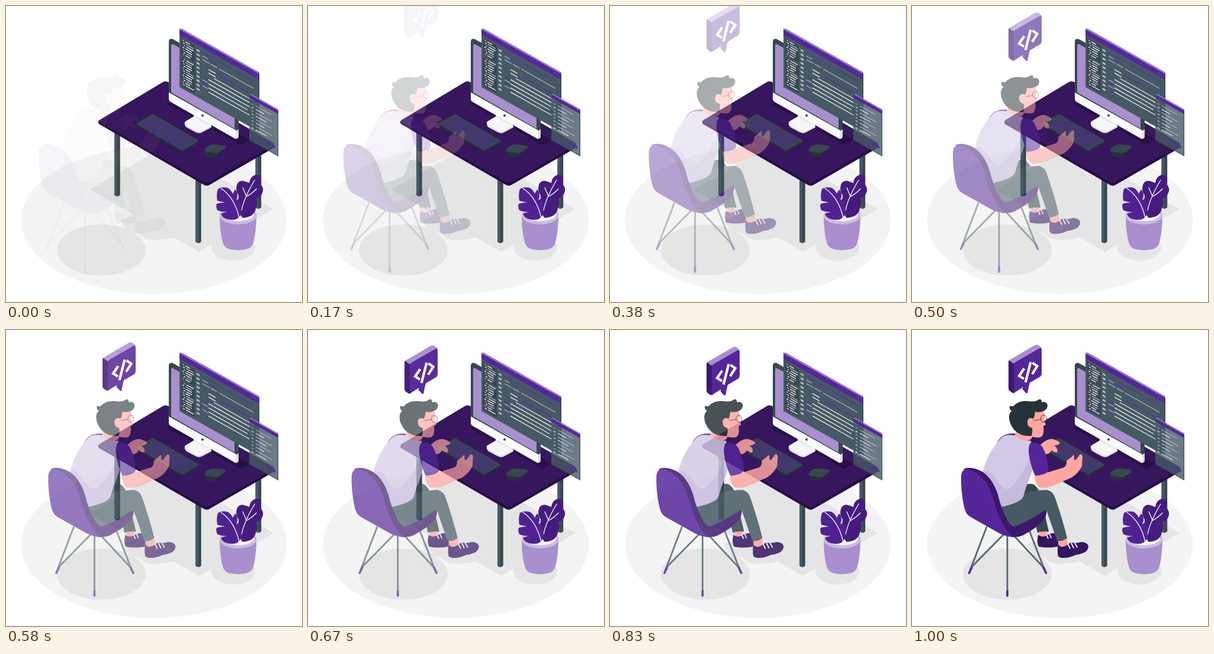
An HTML page for the animation above (1.04 s loop, 500 px wide and 500 px high).

```html
<!DOCTYPE html>
<html lang="en">
<head>
<meta charset="utf-8">
<title>Developer at a desk</title>
<style>
html, body { margin: 0; width: 100%; height: 100%; overflow: hidden; background: #fff; }
svg { display: block; width: 100vw; height: 100vh; }
.line { fill: none; stroke-linecap: round; stroke-linejoin: round; }
.lilac { fill: #a98fcd; }
.purple { fill: #54269a; }
.slate { fill: #455a64; }
.dark { fill: #37474f; }
.ink { fill: #263238; }
.skin { fill: #ffa6a1; }
.shade { fill: #e5e5e5; }
</style>
</head>
<body>
<svg viewBox="0 0 500 500">
  <!-- floor and shadows -->
  <ellipse cx="249.8" cy="362" rx="224.5" ry="124.5" fill="#f4f4f4"/>
  <ellipse cx="161" cy="412.3" rx="75" ry="43.3" class="shade"/>
  <path class="shade" d="M142 310L268 237L452 343L326 415L283 391Q270 395 249 395Q233 395 225 385Q197 378 194 362L216 353Z"/>
  <ellipse cx="384" cy="408" rx="37" ry="22" class="shade"/>

  <!-- desk -->
  <g id="legs"></g>
  <path fill="#250d45" d="M156 194L156 198Q157 200 160 201L334 302Q339 305 344 302L450 241Q453 239 453 233Z"/>
  <path fill="#36175e" d="M159 192L265 128.500Q270 126 275 129L450 230Q455 233 450 236L344 297Q339 299.500 334 297L159 197Q154 194.500 159 192Z"/>
  <path fill="#271046" d="M272 166L290 157L411 226L396 235L346 207L318 190Z"/>

  <!-- monitor -->
  <path fill="#e4e4e4" d="M302 196L318 186L347 202L347 205L330 214Q325 216 320 213L305 205Q301 202 302 196Z"/>
  <path fill="#f6f6f6" d="M303 195L317 187L317 180L346 196L346 203L330 211Q325 213 320 210L304 201Q301 198 303 195Z"/>
  <path fill="#e4e4e4" d="M317 181L346 197L346 202Q331 196 317 187Z"/>
  <path class="dark" d="M275 61Q275 54 282 56L389 117Q393 120 393 124L393 212L389 214L275 149Z"/>
  <path class="lilac" d="M279 67Q279 63 283 65L382 121Q386 124 386 128L386 207L279 146Z"/>
  <path fill="#fafafa" d="M275 146L389 210L389 222Q389 226 385 223L278 162Q275 160 275 156Z"/>
  <path fill="#dedede" d="M389 211L393 208L393 221Q392 225 387 224.500L389 222Z"/>
  <circle cx="332" cy="185" r="2" class="dark"/>

  <!-- code window -->
  <g transform="matrix(1 .563 0 1 293 38)">
    <rect width="135" height="99" class="slate"/>
    <path class="purple" d="M0 1H135V10.500H0Z"/>
    <path fill="#9674c6" d="M0 3L3 -2H135V1L3 1.500Z"/>
    <path class="dark" d="M3 14H26V43H3ZM3 46H26V95H3ZM133.500 10.500H135V99H133.500Z"/>
    <g id="code"></g>
  </g>

  <!-- small window -->
  <g transform="matrix(1 .56 0 1 411 148)">
    <rect y="6" width="49" height="72.500" class="slate" opacity=".8"/>
    <rect y="1" width="49" height="6" class="purple"/>
    <path fill="#9674c6" d="M0 2L2 -1H49V1L2 1Z"/>
    <path class="dark" d="M48 7H49V78.500H48Z"/>
    <path class="dark" opacity=".6" d="M0 77H49V78.500H0Z"/>
    <g id="notes"></g>
  </g>

  <!-- keyboard and mouse -->
  <path class="ink" d="M220.500 198V202L295 245Q297.500 246.500 300 245L325 231V227Z"/>
  <path class="dark" d="M222 197L246 183.500Q248 182 250 183.500L324 226Q326 228 324 229L300 242.500Q297.500 244 295 242.500L222 200Q219 198.500 222 197Z"/>
  <g id="keys" transform="matrix(.77 .447 -.27 .15 248 183.500)"></g>
  <path class="ink" d="M335 244L336 249Q338 254 348 255.500Q352 256 356 252L371 241L371 238Z"/>
  <path class="dark" d="M335 244Q337 238 344 235Q348 233 353 234L368 235.500Q373 237 370 240L358 248Q352 249 346 247Q337 247 335 244Z"/>

  <!-- plant -->
  <path class="lilac" d="M361 352Q361 384 367 402Q371 412.500 392 412.500Q413 412.500 417 402Q423 384 423 350Z"/>
  <ellipse cx="392" cy="354" rx="31.300" ry="15" fill="#cbbbe2"/>
  <ellipse cx="392" cy="352" rx="27" ry="11.500" fill="#fafafa"/>
  <path fill="#451c7d" d="M400 358Q391 350 393 320Q387 312 390 302Q394 292 406 297L411 299Q412 288 422 285Q431 284 431 292Q431 297 430 301Q435 306 434 313Q431 323 423 325Q427 333 422 341Q421 356 400 358Z"/>
  <path class="line" stroke="#fff" stroke-width="1.300" d="M398 345Q402 324 420 294M400 307L406 321M406 322Q414 318 423 309"/>
  <path fill="#502290" d="M358 309Q364 305 374 307Q380 310 383 317L387 310Q391 313 391 322L389 328L394 325Q399 340 397 352Q392 363 378 361Q366 360 363 351Q368 348 374 348Q363 348 357 345Q354 339 356 334Q363 332 370 332L357 329Q355 318 358 309Z"/>
  <path class="line" stroke="#fff" stroke-width="1.300" d="M363 308Q386 323 394 358"/>

  <!-- worker on the chair -->
  <g id="worker">
    <path class="dark" d="M184 267Q194 257 206 261Q215 268 217 280L231 340Q222 345 212 342L201 300Z"/>
    <path class="skin" d="M214 341L228 340L229 351L217 353Z"/>
    <path fill="#341463" d="M213 346Q221 352 229 346Q236 342 243 344L248 357L246 366Q229 369 214 366Q210 358 213 346Z"/>
    <path class="line" stroke="#fff" stroke-width="1.700" d="M227 346L230 352M232 344L235 351"/>

    <path class="line" stroke="#546870" stroke-width="2.800" d="M126 333L98 406M157 343L101 400M161 345V448M168 343L221 400M197 336L225 408"/>
    <path class="line" stroke="#54269a" stroke-width="3.600" d="M101 401L96.500 410.500M161 441V449M222 401L226.500 410.500"/>
    <path fill="#3b186c" d="M150 312L227 302Q228 312 224 319Q212 334 187 347Q178 351 166 349Q150 344 145 328Z"/>

    <path class="skin" d="M246 352L262 349L263 363Q256 370 248 366Z"/>
    <path fill="#341463" d="M247 362Q252 370 262 363L268 359Q278 361 286 358Q297 359 298 365Q298 372 291 376Q284 379 276 380Q267 385 255 385Q248 385 246.500 381Q245 371 247 362Z"/>
    <path class="line" stroke="#fff" stroke-width="1.700" d="M263 361L267 369M269 360L273 368M275 360L279 367"/>
    <path class="slate" d="M146 302L187 276Q205 271 228 270Q238 272 242 284Q254 319 262 351Q255 358 245 356L228 307Q226 302 219 308Q192 326 165 335Q153 322 146 302Z"/>

    <!-- torso -->
    <path class="purple" d="M142 194Q150 172 176 175L170 184Z"/>
    <path class="skin" d="M177 170L204 176Q204 186 194 187Q180 186 173 179Z"/>
    <path fill="#d3c9e5" d="M150 183Q157 175 173 178Q183 187 201 187L205 232Q199 250 193 264L188 281Q184 292 149 299L119 242Q127 207 150 183Z"/>
    <path fill="#c6b9de" d="M119 240Q130 232 143 252Q152 271 164 268Q185 252 199 215L204 234Q199 250 193 264L188 281Q184 292 149 299Z"/>
    <path class="skin" d="M207 245Q208 261 215 266Q224 269 241 262L270 249Q281 242 287 230L288 214Q287 208 283 211L277 219Q273 222 274 212Q272 210 269 215Q266 217 261 221Q262 228 257 232L231 240Z"/>
    <path class="skin" d="M214 197Q225 184 237 184Q248 187 250 191Q247 195 240 195Q248 201 245 207Q240 207 236 203Q231 212 222 209L213 207Z"/>
    <path class="purple" d="M200 191Q212 188 220 197Q229 212 231 238Q223 246 208 246Q200 230 197 207Q197 194 200 191Z"/>

    <!-- head -->
    <path class="skin" d="M196 139L222 137Q226 145 223 153L226 159Q226 161 222 162Q224 177 218 181Q207 183 197 178Z"/>
    <path class="ink" d="M167 136Q163 131 166 128Q170 130 172 128Q180 119 195 120Q208 122 213 118Q219 115 219 122Q227 120 229 127Q229 134 222 137Q214 140 208 138Q207 146 205 150Q197 146 195 154Q196 163 203 166Q204 172 202 179Q183 180 173 169Q163 157 164 145Q165 139 169 136Z"/>
    <ellipse cx="201" cy="157" rx="6" ry="7.500" class="skin"/>
    <ellipse cx="222.500" cy="150" rx="5" ry="6" fill="none" stroke="#37474f"/>
    <path class="line" stroke="#37474f" d="M206 153L218 151"/>

    <!-- chair back -->
    <path fill="#3b186c" d="M87 235Q99 229 118 239Q136 250 145 278Q151 304 164 326Q171 336 190 332L172 350Q153 347 140 320Z"/>
    <path class="purple" d="M83 246Q84 235 94 235Q108 238 120 251Q132 264 138 287Q145 314 155 330Q162 344 173 350Q160 350 147 343L99 316Q91 312 88 299Q82 270 83 246Z"/>
  </g>

  <!-- speech bubble -->
  <g id="bubble">
    <path fill="#3d1a72" d="M163 54Q163 50 168 51L174 56V106L170 106.500L165 103Q163 102 163 98ZM186 99L191 97L198 91L195 107L192 106Z"/>
    <path class="lilac" d="M164 51L207 26Q211 24 214 26L219 30L173 57Q168 55 164 51Z"/>
    <path class="purple" d="M172 60Q172 56 175 54L215 31Q219 29 219 33V73Q219 77 216 79L199 89L194 107L187 97L175 104.500Q172 106 172 102Z"/>
    <path fill="none" stroke="#fff" stroke-width="4.200" d="M189.500 65L181 77.500L189 82.500M200.500 54L191.700 88.500M203.500 55.500L211.500 61L203 74.500"/>
  </g>
</svg>
<script>
const NS = "http://www.w3.org/2000/svg";
const WHITE = "#f5f5f5", LILAC = "#c4b2de", VIOLET = "#5b2ba4";
const byId = id => document.getElementById(id);

function add(parent, tag, attrs) {
  const el = document.createElementNS(NS, tag);
  for (const key in attrs) el.setAttribute(key, attrs[key]);
  byId(parent).append(el);
}

const bar = (parent, x, y, w, fill, h = 1.5) =>
  add(parent, "rect", { x, y, width: w, height: h, fill });

// desk legs: centre x, top, bottom
for (const [x, top, end] of [[188, 205, 319], [325, 285, 398], [426.5, 245, 340]]) {
  add("legs", "path", { class: "dark", d: `M${x - 5} ${top}H${x + 4.7}V${end}Q${x} ${end + 5} ${x - 5} ${end}Z` });
  add("legs", "path", { class: "slate", d: `M${x - 5} ${top}H${x}V${end + 2.5}Q${x - 3} ${end + 2} ${x - 5} ${end}Z` });
}

// sidebar entries
for (let i = 0; i < 20; i++) {
  if (i === 7) continue;
  const y = 16 + i * 3.9, indent = i % 3;
  bar("code", 5 + indent, y, 3, i % 2 ? WHITE : LILAC);
  bar("code", 10 + indent, y, 8 + (i * 5) % 6, i % 4 === 1 ? LILAC : WHITE);
}
for (let i = 0; i < 10; i++) bar("code", 29, 18 + i * 7.3, 5, "#b9c0c6", 3);

// code lines: x, y, width, colour
[
  [39, 18, 86, VIOLET], [39, 24, 9, LILAC], [50, 24, 14, VIOLET],
  [39, 30, 12, LILAC], [53, 30, 11, LILAC], [67, 30, 58, LILAC],
  [49, 41, 12, WHITE], [49, 47, 12, WHITE], [39, 59, 9, VIOLET],
  [39, 64, 9, LILAC], [39, 69, 9, VIOLET], [39, 74, 9, LILAC],
  [69, 42, 50, VIOLET], [58, 51, 67, WHITE], [49, 58, 72, WHITE],
  [49, 65, 76, WHITE], [49, 72, 66, WHITE], [49, 79, 70, WHITE]
].forEach(line => bar("code", ...line, 1.3));
for (const x of [123, 127, 131]) bar("code", x, 4.5, 1.7, "#7048b0", 2);

// note lines
for (let i = 0; i < 8; i++) {
  const y = 14 + i * 5.8;
  bar("notes", 4, y, 3, i % 2 ? WHITE : LILAC, 1.2);
  bar("notes", 11, y, [26, 14, 28, 18][i % 4], i % 2 ? WHITE : LILAC, 1.2);
}
bar("notes", 29, 64, 15, VIOLET, 4);

// key rows
for (let row = 0; row < 6; row++)
  add("keys", "path", {
    d: `M6 ${12 + row * 15}H95`, stroke: "#4f288f", "stroke-width": 9,
    "stroke-dasharray": row === 5 ? "10 2 36 2" : "4.6 1.5"
  });

// bubble steps: frame, offset, opacity
const drop = [
  [0, -75, 0], [4, -53, .04], [9, -29, .3], [14, -4, .85],
  [16, 1, .97], [20, 3.6, 1], [24, 0, 1]
];
const LOOP = 1040, FPS = 24, COUNT = 25, SLIDE = 29;

function bubbleAt(frame) {
  const k = Math.max(1, drop.findIndex(step => step[0] >= frame));
  const a = drop[k - 1], b = drop[k];
  const f = (frame - a[0]) / (b[0] - a[0]);
  return [1, 2].map(n => a[n] + (b[n] - a[n]) * f);
}

function place(id, x, y, opacity) {
  byId(id).setAttribute("transform", `translate(${x} ${y})`);
  byId(id).setAttribute("opacity", opacity);
}

function draw(now) {
  const time = Math.max(0, now - start) % LOOP;
  const frame = Math.min(COUNT - 1, Math.floor((time + 5) * FPS / 1000));
  const p = (frame + 1) / COUNT;
  place("worker", -SLIDE * (1 - p), 0, p);
  const [y, opacity] = bubbleAt(frame);
  place("bubble", 0, y, opacity);
  requestAnimationFrame(draw);
}

const start = performance.now();
draw(start);
</script>
</body>
</html>
```
